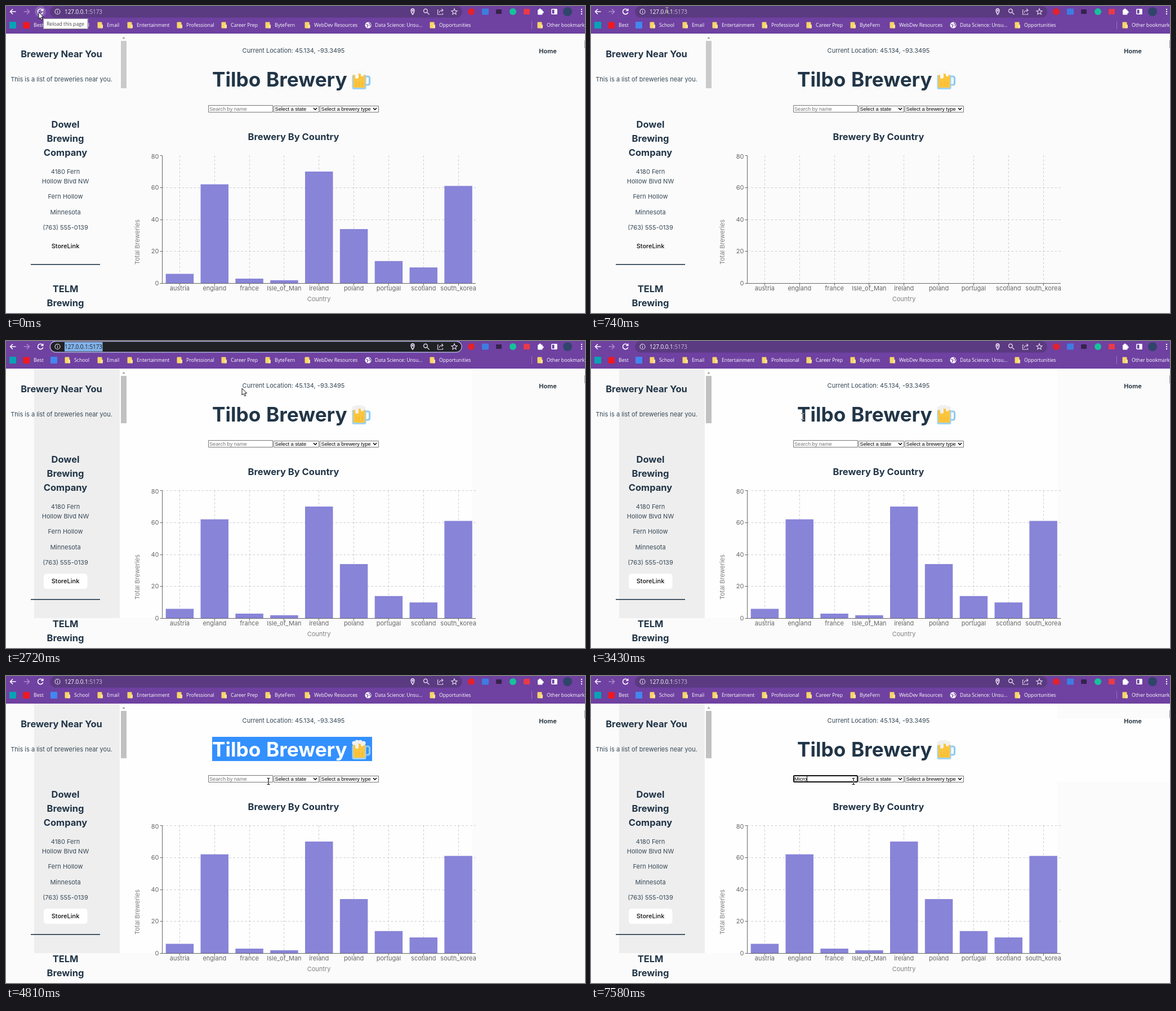
Animation of 1028 by 545 pixels, one loop 8 s. Source, as an HTML page with a canvas:

```html
<!DOCTYPE html>
<html lang="en">
<head>
<meta charset="utf-8">
<title>Brewery dashboard</title>
<style>
html, body { margin: 0; width: 100%; height: 100%; overflow: hidden; background: #fbfbfb; }
canvas { display: block; }
</style>
</head>
<body>
<canvas id="stage" width="1028" height="545"></canvas>
<script>
const ctx = document.getElementById('stage').getContext('2d');
const LOOP = 8000;
const INK = '#213547', BODY = '#374957', PAGE = '#fbfbfb', PURPLE = '#6f41a1', PILL = '#5a3a80';
const INTER = 'Inter, sans-serif', UI = '"Open Sans", sans-serif', FORM = '"Liberation Sans", Arial, sans-serif';

// Stepped tracks: each entry [time, ...values] holds until the next one.
const cursorTrack = [
  [0, 'arrow', 58, 11], [300, 'arrow', 64, 12], [440, 'arrow', 76, 11], [590, 'beam', 108, 9],
  [740, 'beam', 135, 8], [900, 'beam', 160, 10], [1030, 'beam', 183, 13], [1160, 'beam', 192, 14],
  [1590, 'beam', 178, 13], [1730, 'beam', 150, 12], [1870, 'beam', 118, 12], [2010, 'beam', 98, 12],
  [2290, 'beam', 150, 16], [2430, 'arrow', 262, 36], [2570, 'arrow', 360, 66], [2720, 'arrow', 419, 84],
  [2870, 'beam', 420, 128], [3000, 'arrow', 396, 152], [3130, 'beam', 384, 138],
  [3430, 'beam', 376, 134], [3570, 'beam', 371, 132], [3830, 'beam', 400, 132], [3960, 'beam', 452, 133],
  [4100, 'beam', 506, 134], [4250, 'beam', 596, 138], [4380, 'beam', 660, 142],
  [4530, 'beam', 602, 158], [4670, 'beam', 506, 180], [4810, 'beam', 466, 187]
];
const barTrack = [[0, 1], [440, 0], [900, .68], [1030, .93], [1160, 1]];
const urlTrack = [ // focused, selection start, caret shown
  [0, false, 171, false], [1310, true, 104, false], [1460, true, 171, true], [1730, true, 150, false],
  [1870, true, 120, false], [2010, true, 104, false], [3000, false, 171, false]
];
const titleTrack = [[0, 366], [3830, 400], [3960, 440], [4100, 454], [4250, 596], [4380, 650], [5100, 366]];
const fieldTrack = [ // typed text, caret shown
  [0, '', false], [5100, '', true], [5540, '', false], [6110, '', true],
  [6410, 'M', true], [6690, 'Mic', true], [7130, 'Mic', false], [7580, 'Micro', true]
];
const at = (track, t) => track.findLast(step => step[0] <= t).slice(1);

function rect(x, y, w, h, color) {
  ctx.fillStyle = color;
  ctx.fillRect(x, y, w, h);
}
function round(x, y, w, h, r, color) {
  ctx.fillStyle = color;
  ctx.beginPath();
  ctx.roundRect(x, y, w, h, r);
  ctx.fill();
}
function disc(x, y, r, color) {
  ctx.fillStyle = color;
  ctx.beginPath();
  ctx.arc(x, y, r, 0, 7);
  ctx.fill();
}
function stroke(path, color, width = 1.4) {
  ctx.strokeStyle = color;
  ctx.lineWidth = width;
  ctx.stroke(new Path2D(path));
}
function frame(x, y, w, h, color, width = 1, r = 0) {
  ctx.strokeStyle = color;
  ctx.lineWidth = width;
  ctx.beginPath();
  ctx.roundRect(x + width / 2, y + width / 2, w - width, h - width, r);
  ctx.stroke();
}
// y is the middle of the capital letters
function text(str, x, y, { size = 11, weight = 400, color = BODY, family = INTER, align = 'left' } = {}) {
  ctx.font = `${weight} ${size}px ${family}`;
  ctx.textAlign = align;
  ctx.fillStyle = color;
  ctx.fillText(str, x, y + size * .36);
}
const centered = (str, x, y, style) => text(str, x, y, { align: 'center', ...style });
const heading = (str, x, y) => centered(str, x, y, { size: 16.5, weight: 700, color: INK });

function drawToolbar(t) {
  rect(0, 0, 1028, 49, PURPLE);
  if (t < 590) disc(61, 10, 10, '#8a64b5');
  stroke('M17.5 10H7.5M12 5.5L7.5 10L12 14.5', '#fff', 1.6);
  stroke('M31.5 10H41.5M37 5.5L41.5 10L37 14.5', '#a98cc9', 1.6);
  stroke('M65 7.2A4.7 4.7 0 1 0 65.7 11.2M65.7 4.8V8.3H62.2', '#fff', 1.6);
  drawAddress(t);

  const pale = '#ddd0ea';
  stroke('M722 15C718 10 718.4 5 722 5C725.6 5 726 10 722 15Z', pale, 1.8);
  disc(722, 8.4, 1.6, pale);
  stroke('M748.3 8.6A3.4 3.4 0 1 1 741.5 8.6A3.4 3.4 0 1 1 748.3 8.6M747.5 11.2L751.5 15.2', pale);
  stroke('M768 7H766.5V15H775.5V12.5M769 12C769.5 9 771.5 7.5 776 7.5M773.3 4.8L776 7.5L773.3 10.2', pale, 1.2);
  stroke('M796 4.8L797.5 8.4L801 8.7L798.3 11.1L799.1 14.7L796 12.8L792.9 14.7L793.7 11.1L791 8.7L794.5 8.4Z', pale, 1.2);

  disc(826, 10, 6, '#e3222b');
  round(845, 4.5, 12, 11, 1, '#3d7de0');
  round(870, 6, 10, 8, 1, '#35234c');
  disc(900, 10, 6, '#15c39a');
  round(919, 5, 11, 10, 1, '#e83a4a');
  round(944, 6.5, 8.5, 9, 1, '#fff');
  disc(948, 6.4, 2, '#fff');
  disc(952.7, 11, 2, '#fff');
  frame(968, 5, 10.5, 10, '#fff', 1.5, 1);
  rect(973.5, 5, 5, 10, '#fff');
  disc(997, 10, 8, '#31456b');
  for (const y of [6, 10, 14]) disc(1022, y, 1.2, '#fff');

  drawBookmarks();
}

function drawAddress(t) {
  const [focused, from, caret] = at(urlTrack, t);
  round(78, 0, 732, 20.5, 10, focused ? '#202124' : PILL);
  if (focused) frame(77.5, -.3, 732.5, 21, '#b4aee8', 1.5, 10);
  stroke('M96 10A4.5 4.5 0 1 1 87 10A4.5 4.5 0 1 1 96 10M91.5 9.3V12.5M91.5 7.2V8.3', '#e8e0f0', 1.1);
  const style = { size: 9.9, family: UI };
  text('127.0.0.1', 104, 10, { ...style, color: '#fff' });
  const hostWidth = ctx.measureText('127.0.0.1').width;
  text(':5173', 104 + hostWidth, 10, { ...style, color: focused ? '#fff' : '#cbbbdc' });
  if (from < 171) {
    ctx.save();
    ctx.beginPath();
    ctx.rect(from, 2, 171.5 - from, 16.5);
    ctx.clip();
    rect(from, 2, 68, 17, '#82b2ea');
    text('127.0.0.1:5173', 104, 10, { ...style, color: '#202124' });
    ctx.restore();
  }
  if (caret) rect(171, 3, 1, 14, '#fff');
}

function drawBookmarks() {
  round(6, 28, 12, 12, 1, '#06a3b5');
  round(30.5, 28.5, 11.5, 11.5, 2, '#f01820');
  round(79, 28, 12, 12, 1, '#4486ef');
  const labels = [
    ['Best', 49], ['School', 121], ['Email', 179], ['Entertainment', 232], ['Professional', 320],
    ['Career Prep', 399], ['ByteFern', 477], ['WebDev Resources', 547], ['Data Science: Unsu...', 655],
    ['Opportunities', 769], ['Other bookmarks', 960]
  ];
  for (const [label, x] of labels) {
    text(label, x, 34, { size: 8.7, family: UI, color: '#fff' });
    if (label === 'Best') continue;
    if (label.startsWith('Data')) {
      disc(643, 34, 5.5, '#fff');
      stroke('M639 32L643 34L641 38M644 30L647 32.5L646 36', PURPLE, 1.3);
    } else {
      round(x - 16.5, 28.5, 8, 11, 1, '#f9d567');
      round(x - 11, 33, 4, 6.5, 1, '#fbe294');
    }
  }
  rect(933, 27, 1, 14, '#9674ba');
}

function drawSidebar(loaded, repainted) {
  heading('Brewery Near You', 98.5, 85);
  centered('This is a list of breweries near you.', 98.5, 130.5);
  if (!loaded) return;
  ['Dowel', 'Brewing', 'Company'].forEach((line, i) => heading(line, 105.5, 210.5 + i * 24.75));
  const details = [['4180 Fern', 294], ['Hollow Blvd NW', 311], ['Fern Hollow', 338.5], ['Minnesota', 366], ['(763) 555-0139', 393.5]];
  for (const [line, y] of details) centered(line, 105.5, y);
  if (repainted) round(67, 413, 77.5, 27, 5, '#fff');
  centered('StoreLink', 105.5, 426.5, { weight: 500, color: '#111' });
  rect(44, 458, 123, 1.6, INK);
  heading('TELM', 105.5, 502.5);
  heading('Brewing', 105.5, 527);
  rect(204, 62, 10, 84, repainted ? '#c1c1c1' : '#cacaca');
  ctx.fillStyle = '#a3a3a3';
  ctx.fill(new Path2D('M206.5 58L209 54.5L211.5 58Z'));
}

function drawMug(foam) {
  stroke('M637 125H642.5Q645.5 125 645.5 128V137Q645.5 140 642.5 140H637', '#90cbf2', 3.2);
  round(614.5, 122, 25, 26, 3, '#9fd2f3');
  round(616.5, 117, 21, 28, 2, '#fbc53d');
  for (const x of [621, 626.5, 632]) rect(x, 134, 1.2, 8, '#f3b632');
  for (const [x, y, r] of [[618, 119, 3.6], [623, 117, 3.6], [629, 117, 3.6], [635, 119, 3.6]]) disc(x, y, r, foam);
  round(620, 118, 6, 11, 3, foam);
  round(630, 118, 5, 7, 2.5, foam);
}

function drawTitle(t) {
  const words = color => {
    const style = { size: 35.2, weight: 700, color };
    text('Tilbo', 366, 130, style);
    text('Brewery', 462, 130, style);
  };
  const [end] = at(titleTrack, t);
  words(INK);
  if (end > 366) {
    ctx.save();
    ctx.beginPath();
    ctx.rect(366, 108, end - 366, 43);
    ctx.clip();
    rect(366, 108, 300, 43, '#3390ff');
    words('#fff');
    ctx.restore();
  }
  drawMug(t < 900 ? '#f9f9f8' : '#f0f0ee');
}

function drawForm(t) {
  const [typed, caret] = at(fieldTrack, t);
  const style = { size: 9.17, family: FORM };
  rect(359, 176, 115, 13, '#fff');
  if (t >= 5100) frame(359, 176, 115, 13, '#101010', 2, 1);
  else frame(359, 176, 115, 13, '#767676');
  text(typed || 'Search by name', 361, 182.5, { ...style, color: typed ? '#000' : '#757575' });
  if (caret) rect(Math.round(361 + (typed ? ctx.measureText(typed).width : 0)), 178, 1, 10, '#000');
  for (const [label, x, w] of [['Select a state', 475, 81], ['Select a brewery type', 557, 105]]) {
    rect(x, 177, w, 12, '#fff');
    frame(x, 177, w, 12, '#767676');
    text(label, x + 2.6, 182.5, { ...style, color: '#000' });
    const right = x + w - 7;
    stroke(`M${right - 3} 181L${right} 184.2L${right + 3} 181`, '#000', 1.5);
  }
}

const countries = { austria: 6, england: 62, france: 3, Isle_of_Man: 2, ireland: 70, poland: 34, portugal: 14, scotland: 10, south_korea: 61 };
function drawChart(growth, repainted) {
  const left = 277.5, right = 834, top = 265.5, base = 492.5, unit = (base - top) / 80;
  const entries = Object.entries(countries), band = (right - left) / entries.length;
  const center = i => left + band * (i + .5);
  const tick = { color: '#666' };
  ctx.setLineDash([3.5, 3.5]);
  for (let v = 20; v <= (repainted ? 80 : 60); v += 20) {
    const y = Math.floor(base - v * unit) + .5;
    stroke(`M${left} ${y}H${right}`, '#ccc', 1);
  }
  entries.forEach((_, i) => stroke(`M${Math.floor(center(i)) + .5} ${top}V${base}`, '#ccc', 1));
  ctx.setLineDash([]);
  entries.forEach(([name, value], i) => {
    const h = value * unit * growth, w = band * .8;
    rect(center(i) - w / 2, base - h, w, h, '#8884d8');
    stroke(`M${Math.floor(center(i)) + .5} ${base}v4`, '#666', 1);
    centered(name, center(i), 501.5, tick);
  });
  stroke(`M${left} ${top}V${base}H${right}`, '#666', 1);
  for (let v = 0; v <= 80; v += 20) {
    const y = Math.floor(base - v * unit) + .5;
    stroke(`M${left - 4} ${y}H${left}`, '#666', 1);
    text(v, 271.5, v === 80 ? 267 : y, { ...tick, align: 'right' });
  }
  centered('Country', 555.5, 520.5, { color: '#808080' });
  ctx.save();
  ctx.translate(233, 419);
  ctx.rotate(-Math.PI / 2);
  centered('Total Breweries', 0, 0, { color: '#808080' });
  ctx.restore();
}

function drawPage(t) {
  const repainted = t >= 900, loaded = t < 440 || t >= 740;
  rect(0, 49, 1028, 496, PAGE);
  if (t >= 440 && t < 590) return;
  if (repainted) {
    rect(50, 49, 152, 443, '#eeeeee');
    rect(202, 49, 626, 443, '#fefefe');
  }
  if (t >= 6410) rect(828, 75, 200, 113, '#fefefe');
  drawSidebar(loaded, repainted);
  centered('Current Location: 45.134, -93.3495', 510.5, 79.5);
  centered('Home', 962, 80.5, { weight: 600, color: '#1a2836' });
  rect(1027, 61, 1, 14, '#999');
  drawTitle(t);
  drawForm(t);
  heading('Brewery By Country', 510.5, 232.5);
  if (loaded) drawChart(at(barTrack, t)[0], repainted);
}

function drawTooltip() {
  rect(66, 22, 79.5, 19, '#fff');
  frame(66, 22, 79.5, 19, '#8a8a8a');
  text('Reload this page', 72, 32, { size: 8.7, family: UI, color: '#444' });
}

function drawCursor(t) {
  const [kind, x, y] = at(cursorTrack, t);
  ctx.save();
  ctx.translate(x, y);
  if (kind === 'arrow') {
    const shape = 'M0 0V12L2.8 9.5L4.8 13.8L6.8 12.9L4.9 8.7H8.6Z';
    ctx.fillStyle = '#fff';
    ctx.fill(new Path2D(shape));
    stroke(shape, '#111', 1);
  } else {
    ctx.globalCompositeOperation = 'difference';
    stroke('M-2.5 -5.5H-.5L0 -5L.5 -5.5H2.5M0 -5V5M-2.5 5.5H-.5L0 5L.5 5.5H2.5', '#fff', 1.2);
  }
  ctx.restore();
}

function draw(now) {
  const t = now % LOOP;
  drawPage(t);
  drawToolbar(t);
  if (t < 150) drawTooltip();
  drawCursor(t);
  requestAnimationFrame(draw);
}
draw(performance.now());
</script>
</body>
</html>
```
